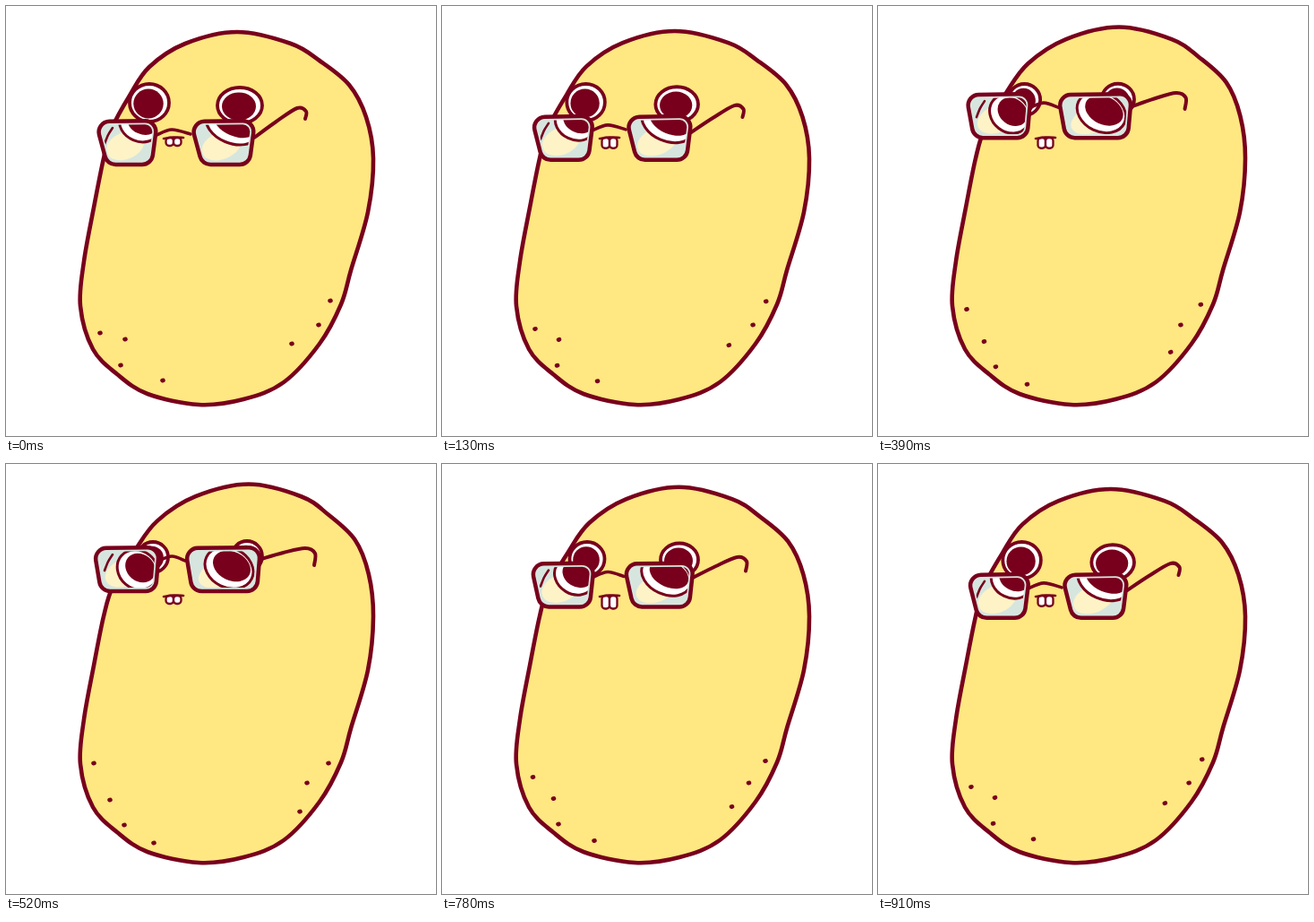
An HTML page with a canvas that plays this animation: 480 px wide and 480 px high, repeating every 1.04 s.

```html
<!DOCTYPE html>
<html lang="en">
<head>
<meta charset="utf-8">
<title>Potato with glasses</title>
<style>
html, body { margin: 0; width: 100%; height: 100%; overflow: hidden; background: #fff; }
canvas { display: block; width: 480px; height: 480px; }
</style>
</head>
<body>
<canvas id="stage" width="480" height="480"></canvas>
<script>
const ctx = document.getElementById('stage').getContext('2d');
const INK = '#78001c', SKIN = '#ffe782', GLASS = '#d6e6df', CREAM = '#fdf3c6', WHITE = '#fff';
const STEP = 130, STEPS = 8;

// Key points of the outline, clockwise from the top.
const OUTLINE = [[258, 29], [318, 42], [350, 61], [383, 88], [402, 124], [410, 170], [404, 230],
  [385, 295], [374, 333], [350, 377], [310, 420], [265, 439], [215, 445], [158, 433], [124, 411],
  [97, 383], [83, 335], [87, 285], [98, 225], [109, 170], [118, 137], [138, 100], [160, 68], [200, 42]];

// x, y and how far each freckle slides.
const SPOTS = [[105, 365, -7, -31], [133, 372, -17, 3], [128, 401, 4, 2], [175, 418, -10, 5],
  [319, 377, 9, 11], [349, 356, -13, 0], [362, 329, -2, 5]];

const lerp = (a, b, u) => a + (b - a) * u;
const mix = (a, b, u) => a.map((v, i) => lerp(v, b[i], u));

// Smooth curve through all points.
function curve(p, closed) {
  const n = p.length, path = new Path2D();
  const at = i => closed ? p[(i + n) % n] : p[Math.max(0, Math.min(n - 1, i))];
  path.moveTo(...p[0]);
  for (let i = 0; i < (closed ? n : n - 1); i++) {
    const a = at(i - 1), b = at(i), c = at(i + 1), d = at(i + 2);
    path.bezierCurveTo(b[0] + (c[0] - a[0]) / 6, b[1] + (c[1] - a[1]) / 6,
      c[0] - (d[0] - b[0]) / 6, c[1] - (d[1] - b[1]) / 6, ...c);
  }
  if (closed) path.closePath();
  return path;
}

function rounded(p, r) {
  const path = new Path2D(), n = p.length, last = p[n - 1];
  path.moveTo((last[0] + p[0][0]) / 2, (last[1] + p[0][1]) / 2);
  p.forEach((q, i) => path.arcTo(...q, ...p[(i + 1) % n], r));
  path.closePath();
  return path;
}

function oval(x, y, rx, ry, tilt = 0) {
  const path = new Path2D();
  path.ellipse(x, y, rx, ry, tilt, 0, 2 * Math.PI);
  return path;
}

function fill(path, color) {
  ctx.fillStyle = color;
  ctx.fill(path);
}

function ink(path, width, color = INK) {
  ctx.strokeStyle = color;
  ctx.lineWidth = width;
  ctx.stroke(path);
}

function drawBody(u) {
  const body = curve(OUTLINE.map(([x, y]) => {
    const lean = u * Math.max(0, 1 - y / 150);
    return [x + 16 * lean, y - 8 * lean];
  }), true);
  fill(body, SKIN);
  ink(body, 4.6);
  for (const [x, y, dx, dy] of SPOTS) fill(oval(x + dx * u, y + dy * u, 2.8, 2.4, -.4), INK);
}

function drawEye(x, y, rx, ry) {
  const shape = oval(x, y, rx, ry);
  fill(shape, WHITE);
  ink(shape, 3.8);
  fill(oval(x - 1, y + 1, rx * .76, ry * .78), INK);
}

function drawTeeth(u) {
  const top = 147, h = 9 + 11 * u * (1 - u) * 2;
  for (const x of [178.5, 187]) {
    const tooth = rounded([[x, top], [x + 8.5, top], [x + 8.5, top + h], [x, top + h]], 3.5);
    fill(tooth, WHITE);
    ink(tooth, 2.3);
  }
  ink(curve([[176, 148], [187, 146.5], [198, 147]]), 2.6);
}

// The pupil seen through the glass is [x, y, rx, ry, tilt].
function drawLens(x, y, w, inset, pupil, edge) {
  const h = 48, [px, py, rx, ry, tilt] = pupil;
  const rim = rounded([[x, y], [x + w, y - 1], [x + w - inset / 2, y + h], [x + inset, y + h]], 12);
  ctx.save();
  ctx.clip(rim);
  fill(rim, GLASS);
  fill(oval(x + w * .48, y + 27, w * .32, 15, -.4), CREAM);
  const ring = oval(px - 3, py + 2, rx + 6, ry + 6, tilt);
  fill(ring, WHITE);
  ink(ring, 3);
  fill(oval(...pupil), INK);
  if (edge) ink(curve(edge), 2.6);
  ink(rim, 8, GLASS);
  ctx.restore();
  ink(rim, 4.5);
}

function drawGlasses(u) {
  const y = lerp(129, 94, u), inset = lerp(13, 8, u);
  const left = lerp(100, 98, u), right = lerp(206, 200, u);
  ink(curve([[168, y + 15], [185, y + 9], [right, y + 14]]), 3.6);
  const [ax, ay, bx, by, tipX, tipY] = mix([277, 147, 325, 114, 334, 126], [285, 106, 334, 94, 344, 113], u);
  ink(curve([[ax, ay], [(ax + bx) / 2, (ay + by) / 2 - 1], [bx, by], [tipX + 1, lerp(by, tipY, .3)], [tipX, tipY]]), 4);
  drawLens(left, y, lerp(69, 73, u), inset, mix([152, 131, 17, 12, .4], [150, 116, 18, 15, .7], u),
    [[119, y + 7], [114, y + 15], [110, y + 25]]);
  drawLens(right, y, lerp(72, 84, u), inset, mix([255, 132, 24, 13, .4], [252, 114, 22, 16, .45], u));
}

function draw(u) {
  ctx.fillStyle = WHITE;
  ctx.fillRect(0, 0, 480, 480);
  ctx.lineCap = ctx.lineJoin = 'round';
  drawBody(u);
  drawEye(...mix([160, 108, 22, 21], [164, 104, 17, 17], u));
  drawEye(...mix([261, 111, 25, 20], [269, 103, 17, 17], u));
  drawTeeth(u);
  drawGlasses(u);
}

// The glasses ease up and down in held steps.
function tick() {
  const step = Math.floor(performance.now() / STEP) % STEPS;
  draw(Math.sin(Math.PI * step / STEPS) ** 2);
  requestAnimationFrame(tick);
}
tick();
</script>
</body>
</html>
```
